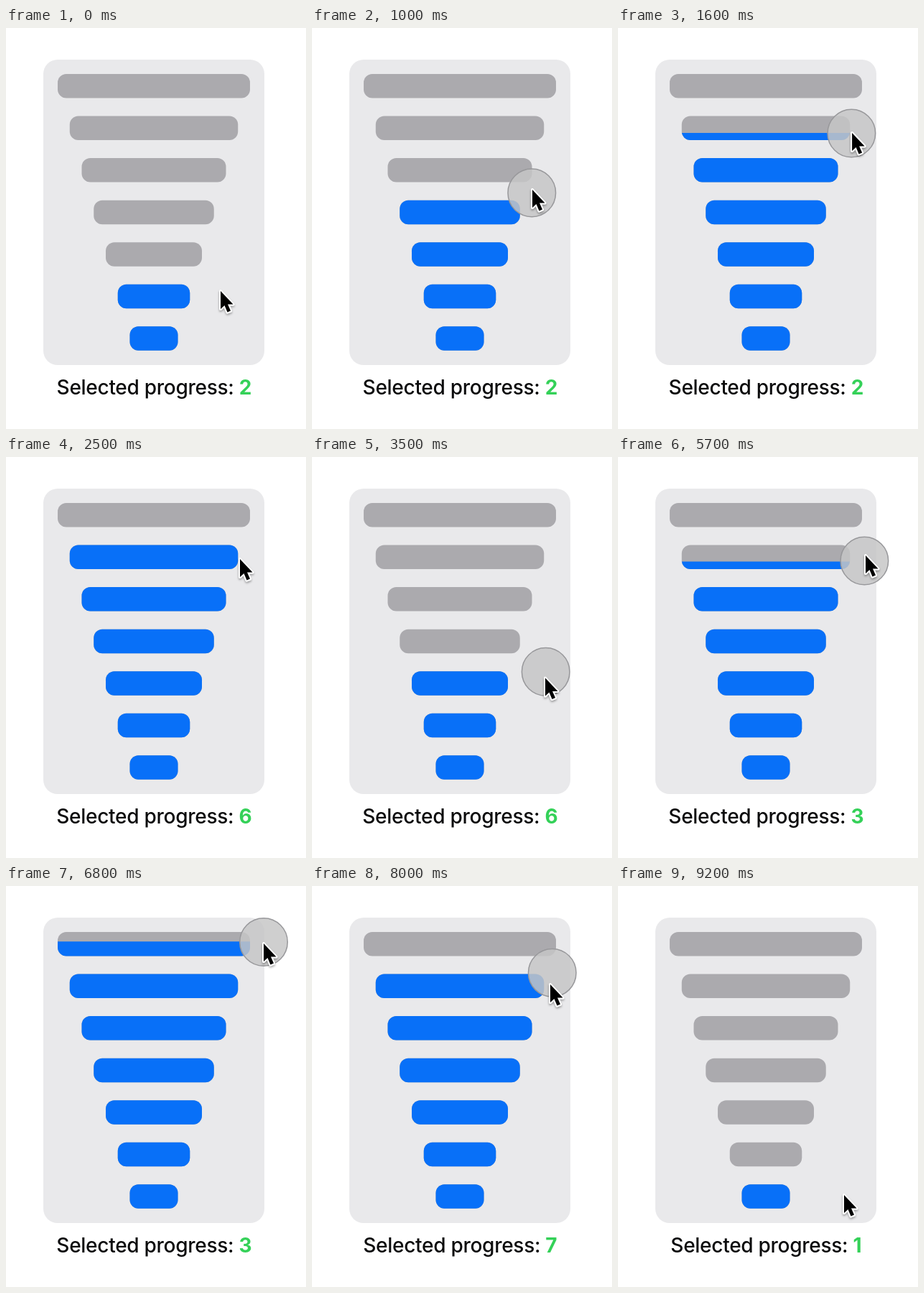
An HTML page that plays this animation: 418x558 px, repeating every 9400 ms.

```html
<!DOCTYPE html>
<html lang="en">
<head>
<meta charset="utf-8">
<title>Progress picker</title>
<style>
  html, body { margin: 0; width: 100%; height: 100%; overflow: hidden; background: #fff; }
  svg { display: block; width: 418px; height: 558px; }
  text { font: 500 28px Inter, Roboto, sans-serif; letter-spacing: -0.28px; text-anchor: middle; fill: #0b0b0c; }
  #digit { font-weight: 700; fill: #34d158; }
</style>
</head>
<body>
<svg viewBox="0 0 418 558">
  <defs>
    <clipPath id="clip"><rect id="fill" x="52" width="308" height="420"/></clipPath>
    <filter id="shadow" x="-50%" y="-30%" width="200%" height="170%">
      <feDropShadow dx="0" dy="2" stdDeviation="1.6" flood-opacity="0.35"/>
    </filter>
  </defs>
  <rect x="52" y="44" width="308" height="425" rx="20" fill="#e9e9eb"/>
  <g id="track" fill="#abaaae"></g>
  <g clip-path="url(#clip)"><g id="active" fill="#0870f8"></g></g>
  <text x="206.3" y="510">Selected progress: <tspan id="digit"></tspan></text>
  <circle id="touch" r="33.3" fill="#c6c6c6" fill-opacity="0.84" stroke="#98989b" stroke-width="1.5"/>
  <path id="cursor" d="M0 0V25L5.5 20L9.5 29.5L14 27.6L10 18.5H17.5Z" fill="#000" stroke="#fff"
        stroke-width="4" stroke-linejoin="round" paint-order="stroke" filter="url(#shadow)"/>
</svg>
<script>
const LOOP = 9400, STEP = 100, COUNT = 7, FIRST_VALUE = 2;
const TOP = 64, PITCH = 58.55, HEIGHT = 33.5;
const TOUCH_LAG = 40, FILL_LAG = 48;

// Turning points of the pointer, joined by smooth curves
const keys = [
  { t: 200, x: 299, y: 364 },
  { t: 1000, x: 307, y: 223 },
  { t: 1700, x: 327, y: 141 },
  { t: 2500, x: 326, y: 140 },
  { t: 2900, x: 331, y: 142 },
  { t: 3500, x: 325, y: 305.5 },
  { t: 3900, x: 314, y: 323 },
  { t: 5000, x: 314, y: 323 },
  { t: 5700, x: 345, y: 135 },
  { t: 6050, x: 354, y: 96 },
  { t: 6600, x: 354, y: 96 },
  { t: 6760, x: 359, y: 78 },
  { t: 7700, x: 359, y: 78 },
  { t: 8000, x: 332, y: 135 },
  { t: 8600, x: 316, y: 420 },
  { t: 9000, x: 315, y: 431 },
  { t: 9200, x: 315, y: 428 }
];

// Each drag ends by selecting a value
const drags = [
  { down: 200, up: 2200, value: 6 },
  { down: 2700, up: 4500, value: 3 },
  { down: 5000, up: 7100, value: 7 },
  { down: 7500, up: 9200, value: 1 }
];

const el = id => document.getElementById(id);

function setAttrs(node, attrs) {
  for (const name in attrs) node.setAttribute(name, attrs[name]);
}

function addBars(group) {
  for (let i = 0; i < COUNT; i++) {
    const bar = document.createElementNS("http://www.w3.org/2000/svg", "rect");
    const width = HEIGHT * (8 - i);
    setAttrs(bar, { x: 206 - width / 2, y: TOP + PITCH * i, width, height: HEIGHT, rx: 12 });
    group.append(bar);
  }
}

const slope = (a, b, axis) => (b[axis] - a[axis]) / (b.t - a.t);

// Speed at a key, limited so the curve never overshoots
function speed(i, axis) {
  if (i === 0 || i === keys.length - 1) return 0;
  const [a, b, c] = keys.slice(i - 1, i + 2);
  const before = slope(a, b, axis), after = slope(b, c, axis);
  if (before * after <= 0) return 0;
  const limit = 3 * Math.min(Math.abs(before), Math.abs(after));
  return Math.max(-limit, Math.min(limit, slope(a, c, axis)));
}

function pointer(t) {
  const next = keys.findIndex(k => k.t > t);
  if (next === 0) return keys[0];
  if (next < 0) return keys[keys.length - 1];
  const a = keys[next - 1], b = keys[next], span = b.t - a.t;
  const u = (t - a.t) / span, v = 1 - u;
  const at = axis =>
    a[axis] * v * v * (1 + 2 * u) + b[axis] * u * u * (3 - 2 * u) +
    span * u * v * (speed(next - 1, axis) * v - speed(next, axis) * u);
  return { x: at("x"), y: at("y") };
}

function draw(t) {
  const done = drags.filter(d => t >= d.up).pop();
  const value = done ? done.value : FIRST_VALUE;
  const dragging = drags.some(d => t >= d.down && t < d.up);

  const tip = pointer(t), touch = pointer(t - TOUCH_LAG);
  const level = dragging ? pointer(t - FILL_LAG).y - 1 : TOP + PITCH * (COUNT - value) - 5;

  setAttrs(el("cursor"), { transform: `translate(${tip.x} ${tip.y + 2})` });
  setAttrs(el("touch"), { cx: touch.x, cy: touch.y, visibility: dragging ? "visible" : "hidden" });
  setAttrs(el("fill"), { y: level });
  el("digit").textContent = value;
}

addBars(el("track"));
addBars(el("active"));

const start = performance.now();
function tick() {
  const t = (performance.now() - start) % LOOP;
  draw(Math.floor(t / STEP) * STEP);
  requestAnimationFrame(tick);
}
tick();
</script>
</body>
</html>
```
